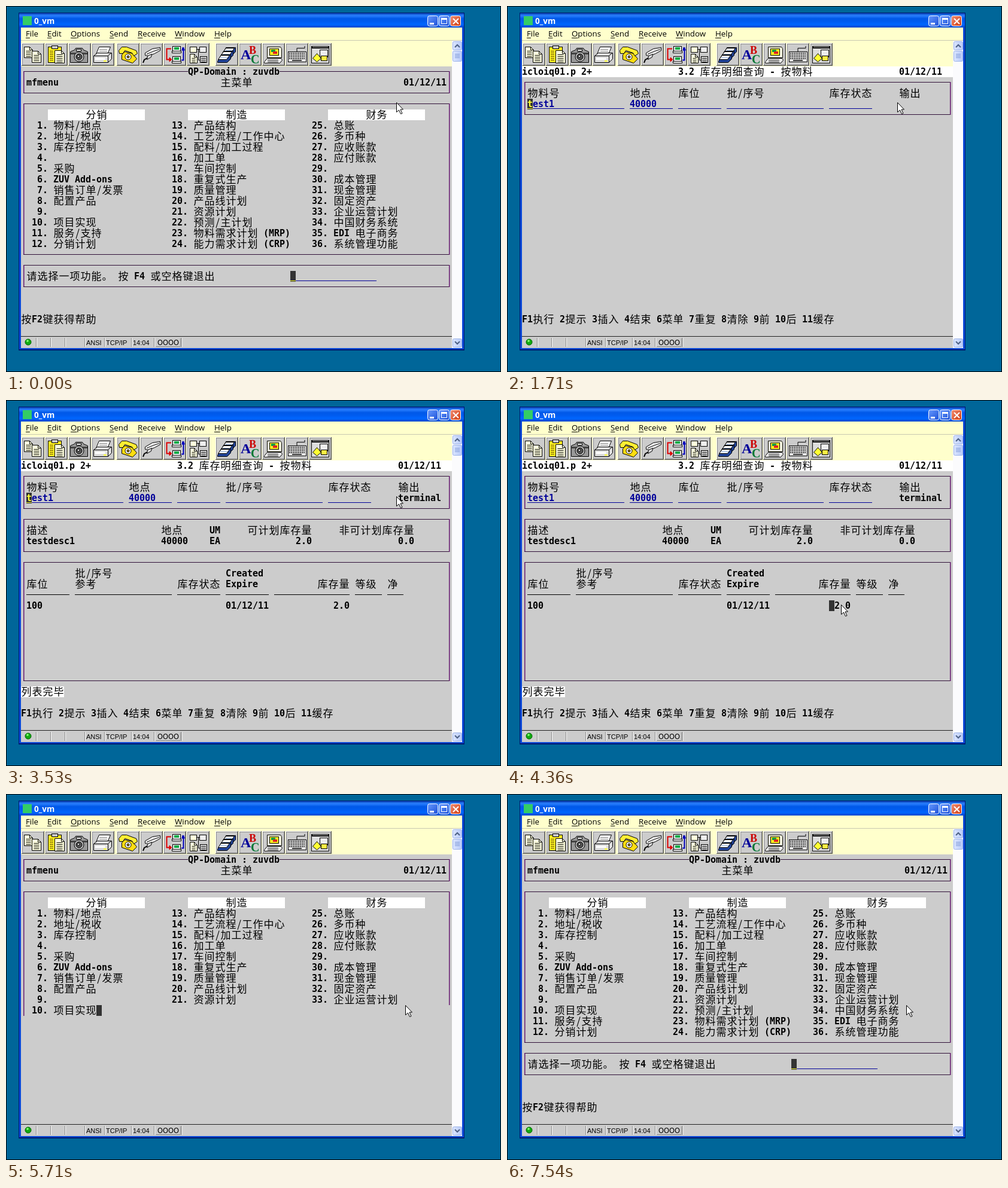
Recreate the animation shown at these times as an HTML page with a canvas. Size 827 by 612 pixels, loop 8 s.

```html
<!DOCTYPE html>
<html lang="zh">
<head>
<meta charset="utf-8">
<title>Terminal session</title>
<style>
html, body { margin: 0; width: 100%; height: 100%; overflow: hidden; background: #069; }
canvas { display: block; }
</style>
</head>
<body>
<canvas id="stage" width="827" height="612"></canvas>
<script>
const g = document.getElementById('stage').getContext('2d');
const LOOP = 8000, X0 = 25, Y0 = 101, CW = 9, RH = 18;
const GREY = '#cccccc', INK = '#000', BLUE = '#000099', DARK = '#333', YEL = '#ffff33';
const MONO = 'bold 15px "DejaVu Sans Mono", monospace';
const HAN = '300 17px "Noto Sans CJK SC", "Noto Sans CJK", sans-serif';

// ---- drawing helpers ----
function fill(c, x, y, w, h) { g.fillStyle = c; g.fillRect(x, y, w, h); }
function box(c, x, y, w, h, edge = INK) { fill(edge, x, y, w, h); fill(c, x + 1, y + 1, w - 2, h - 2); }
function path(p) {
  g.beginPath();
  for (let i = 0; i < p.length; i += 2) g.lineTo(p[i], p[i + 1]);
}
function poly(c, p, edge = INK) {
  path(p);
  g.closePath();
  g.fillStyle = c; g.fill();
  g.strokeStyle = edge; g.lineWidth = 1; g.stroke();
}
function line(c, p, w = 1) { path(p); g.strokeStyle = c; g.lineWidth = w; g.stroke(); }
function disc(c, x, y, r, edge = INK) {
  g.beginPath(); g.arc(x, y, r, 0, 7);
  g.fillStyle = c; g.fill();
  g.strokeStyle = edge; g.lineWidth = 1; g.stroke();
}
function label(s, x, y, font, c = INK) {
  g.font = font; g.fillStyle = c; g.textAlign = 'left';
  g.fillText(s, x, y);
}
function grad(x0, y0, x1, y1, ...stops) {
  const k = g.createLinearGradient(x0, y0, x1, y1);
  stops.forEach((c, i) => k.addColorStop(i / (stops.length - 1), c));
  return k;
}
function bevel(x, y, w, h, c = GREY) {
  fill('#555', x, y, w, h);
  fill('#fff', x, y, w - 1, h - 1);
  fill('#888', x + 1, y + 1, w - 2, h - 2);
  fill(c, x + 2, y + 2, w - 4, h - 4);
}
function rows(c, x, y, w, n, gap = 3) { for (let i = 0; i < n; i++) fill(c, x, y + i * gap, w, 1); }

// ---- toolbar ----
function page(x, y, w, h, c = '#ffffdd') {
  poly(c, [x, y, x + w - 5, y, x + w, y + 5, x + w, y + h, x, y + h]);
  line(INK, [x + w - 5, y, x + w - 5, y + 5, x + w, y + 5]);
  rows(INK, x + 3, y + 6.5, w - 6, Math.floor((h - 6) / 3));
}
function pc(x, y, c) {
  box('#eee', x, y, 14, 9);
  fill(c, x + 3, y + 2, 8, 4);
  box('#fff', x - 1, y + 8, 16, 4);
}
const icons = [
  [26, () => { page(4.5, 6.5, 14, 18); page(17.5, 13.5, 15, 19); }],
  [65, () => {
    box('#ffee22', 5, 6, 23, 27);
    box('#ccc', 11, 4, 11, 6);
    rows('#665500', 8, 13, 6, 6);
    page(16.5, 12.5, 16, 21);
  }],
  [104, () => {
    poly('#999', [3.5, 14.5, 10.5, 11.5, 12.5, 8.5, 23.5, 8.5, 25.5, 11.5, 32.5, 14.5, 32.5, 32.5, 3.5, 32.5]);
    fill('#444', 4, 16, 28, 3);
    box('#fff', 13, 10, 9, 4);
    disc('#bbb', 18, 23, 8);
    disc('#555', 18, 23, 5);
    disc('#eee', 17, 22, 2);
  }],
  [143, () => {
    poly('#fff', [12.5, 6.5, 31.5, 6.5, 26.5, 18.5, 7.5, 18.5]);
    rows('#777', 13, 10, 13, 3);
    poly('#ddd', [3.5, 21.5, 9.5, 16.5, 33.5, 16.5, 33.5, 26.5, 27.5, 32.5, 3.5, 32.5]);
    line(INK, [3, 21.5, 27.5, 21.5, 27.5, 32], 1);
    line(INK, [27, 21.5, 33, 16.5]);
    fill('#fff', 6, 25, 17, 3);
    fill(YEL, 20, 29, 5, 2);
  }],
  [185, () => {
    poly('#ffdd11', [8.5, 19.5, 13.5, 14.5, 26.5, 17.5, 33.5, 26.5, 26.5, 33.5, 8.5, 27.5]);
    poly('#ffee33', [3.5, 12.5, 8.5, 6.5, 16.5, 6.5, 32.5, 12.5, 34.5, 17.5, 28.5, 21.5, 25.5, 16.5, 13.5, 12.5, 10.5, 17.5, 4.5, 17.5]);
    disc('#fff', 19, 23, 5);
    disc('#aa8800', 19, 23, 2);
  }],
  [224, () => {
    poly('#eee', [8.5, 16.5, 20.5, 9.5, 33.5, 7.5, 33.5, 12.5, 24.5, 17.5, 14.5, 21.5, 8.5, 20.5]);
    line(INK, [11, 18.5, 23, 13.5, 32, 10.5]);
    poly('#ddd', [12.5, 21.5, 19.5, 18.5, 18.5, 23.5, 11.5, 27.5]);
    line(INK, [12, 25, 7, 28, 5, 33], 2);
  }],
  [263, () => {
    pc(15, 5, '#00aa44');
    pc(15, 22, '#00aa44');
    line('#dd0000', [13, 9.5, 5.5, 9.5, 5.5, 27.5, 12, 27.5], 2);
    poly('#dd0000', [10, 24, 14, 27.5, 10, 31], '#dd0000');
    line('#0000bb', [30, 28.5, 33.5, 28.5, 33.5, 8.5, 31, 8.5], 2);
    poly('#0000bb', [30.5, 12, 33.5, 7, 35.5, 12], '#0000bb');
  }],
  [302, () => {
    box('#ffffdd', 5, 6, 12, 10);
    box('#eee', 21, 6, 12, 10);
    line(INK, [17, 10.5, 22, 10.5]);
    line(INK, [19.5, 10, 19.5, 28.5, 23, 28.5]);
    page(5.5, 18.5, 12, 15);
    box('#ddd', 22, 22, 12, 11);
    rows(INK, 24, 25, 8, 3);
  }],
  [350, () => {
    for (let i = 0; i < 3; i++) {
      const x = 11.5 - i * 4, y = 7.5 + i * 6;
      poly('#224499', [x, y + 11, x + 6, y, x + 22, y, x + 22, y + 7, x + 16, y + 13, x, y + 13]);
      poly('#fff', [x + 1, y + 8, x + 6, y + 1, x + 20, y + 1, x + 15, y + 8]);
      line('#88aadd', [x + 5, y + 5, x + 16, y + 5]);
    }
  }],
  [389, () => {
    const f = s => 'bold ' + s + 'px "Liberation Serif", serif';
    label('A', 3, 27, f(24), '#000099');
    label('B', 17, 18, f(18), '#cc0000');
    label('C', 20, 34, f(20), '#007733');
  }],
  [428, () => {
    poly('#ffffdd', [8.5, 6.5, 30.5, 6.5, 32.5, 9.5, 32.5, 24.5, 8.5, 24.5]);
    box('#ffee22', 12, 9, 16, 12);
    fill('#009944', 15, 11, 7, 4);
    fill('#dd2222', 18, 14, 7, 4);
    poly('#eee', [3.5, 31.5, 8.5, 25.5, 31.5, 25.5, 33.5, 28.5, 29.5, 33.5, 3.5, 33.5]);
    rows(INK, 9, 28, 18, 2);
  }],
  [467, () => {
    box('#eee', 4, 14, 31, 18);
    for (let r = 0; r < 4; r++) for (let i = 0; i < 9; i++) fill('#333', 6 + i * 3, 16 + r * 3, 2, 2);
    fill('#333', 11, 28, 16, 2);
    line(INK, [19, 14, 19, 8.5, 32, 8.5, 32, 5]);
  }],
  [506, () => {
    box('#ddd', 4, 5, 30, 29);
    fill(INK, 4, 5, 30, 4);
    rows('#ccc', 6, 6, 26, 1);
    box('#eee', 18, 11, 14, 13);
    poly(YEL, [6.5, 25.5, 13.5, 17.5, 20.5, 25.5, 13.5, 31.5]);
    box('#ffee44', 20, 21, 11, 9);
  }]
];

// ---- window ----
function winButton(x, c0, c1) {
  g.beginPath(); g.roundRect(x + .5, 16.5, 17, 17, 3);
  g.fillStyle = grad(x, 16, x + 17, 34, c0, c1); g.fill();
  g.strokeStyle = '#fff'; g.lineWidth = 1; g.stroke();
}
function scrollButton(y, h) {
  g.beginPath(); g.roundRect(746.5, y + .5, 15, h - 1, 2);
  g.fillStyle = grad(746, 0, 762, 0, '#dce6ff', '#b6c9f8'); g.fill();
  g.strokeStyle = '#9db4e8'; g.lineWidth = 1; g.stroke();
}
function chrome() {
  fill(INK, 0, 0, 827, 612);
  fill('#006699', 1, 1, 825, 610);
  fill('#001a70', 21, 11, 745, 565);
  fill('#0a48d8', 22, 12, 743, 562);
  fill(grad(0, 11, 0, 36, '#0030a0', '#2a80ff', '#0058e8', '#005cf0', '#0066ff', '#0044cc'), 22, 12, 743, 24);
  fill('#33cc66', 28, 17, 15, 15);
  label('0_vm', 47, 30, 'bold 13.5px "Open Sans", sans-serif', '#fff');
  winButton(704, '#6a9cff', '#1c50d8');
  fill('#fff', 708, 28, 7, 3);
  winButton(723, '#6a9cff', '#1c50d8');
  g.strokeStyle = '#fff'; g.strokeRect(727.5, 20.5, 9, 9);
  fill('#fff', 727, 20, 10, 3);
  winButton(742, '#f09078', '#d03c10');
  line('#fff', [747, 21, 756, 30], 2);
  line('#fff', [756, 21, 747, 30], 2);

  fill('#ffffcc', 25, 36, 737, 65);
  fill('#c8c8b0', 25, 57, 737, 1);
  const menu = [['File', 33], ['Edit', 69], ['Options', 108], ['Send', 173], ['Receive', 220], ['Window', 282], ['Help', 348]];
  for (const [s, x] of menu) {
    label(s, x, 51, '13.3px "Open Sans", sans-serif');
    fill(INK, x, 53, g.measureText(s[0]).width, 1);
  }
  for (const [x, draw] of icons) {
    bevel(x, 62, 38, 38);
    g.save(); g.translate(x, 62); draw(); g.restore();
  }

  fill('#fbfbfd', 745, 58, 17, 514);
  scrollButton(59, 15);
  scrollButton(75, 18);
  scrollButton(556, 15);
  line('#4d6185', [750, 69, 754, 65, 758, 69], 2);
  line('#4d6185', [750, 561, 754, 565, 758, 561], 2);
  rows('#8ca4dc', 750, 80, 8, 4, 2);

  fill(GREY, X0, Y0, 720, 471);
  fill('#222', X0, 552, 720, 1);
  for (const x of [50, 74, 98, 131, 164, 209, 247, 293]) {
    fill('#888', x, 555, 1, 15);
    fill('#fff', x + 1, 555, 1, 15);
  }
  disc('#11aa11', 37, 562, 5, '#006600');
  disc('#99ff88', 36, 560, 1.5, '#66ee55');
  const small = '11px "Liberation Sans", sans-serif';
  label('ANSI', 134, 567, small);
  label('TCP/IP', 167, 567, small);
  label('14:04', 212, 567, small);
  line('#888', [250.5, 569.5, 291.5, 569.5, 291.5, 555.5]);
  label('OOOO', 253, 567, '11.4px "DejaVu Sans", sans-serif');
}

// ---- terminal grid ----
const px = c => X0 + c * CW, py = r => Y0 + r * RH;
function put(r, c, s, color = INK) {
  g.fillStyle = color; g.textAlign = 'center';
  let wide = false;
  for (const ch of s) {
    const thin = ch === '/' && wide;
    wide = ch > '\u2e7f';
    g.font = wide || thin ? HAN : MONO;
    g.fillText(ch, px(c) + (wide ? CW : CW / 2), py(r) + (wide || thin ? 15 : 14));
    c += wide ? 2 : 1;
  }
}
function frame(r0, r1) {
  const y = py(r0) + 8, h = (r1 - r0) * RH;
  fill('#301038', 29, y, 712, 1);
  fill('#301038', 29, y + h, 712, 1);
  fill('#661a70', 29, y, 1.5, h);
  fill('#661a70', 740, y, 1.5, h + 1);
}
function caret(r, c, field, ch) {
  fill(DARK, px(c), py(r), CW, RH);
  if (field) fill(YEL, px(c), py(r) + 16, CW, 1);
  if (ch) put(r, c, ch, YEL);
}
function input(r, c, n, s, live) {
  if (live) fill(BLUE, px(c), py(r) + 16, n * CW, 1);
  put(r, c, s, live ? BLUE : INK);
}

const columns = [
  [5, '分销', '物料/地点,地址/税收,库存控制,,采购,ZUV Add-ons,销售订单/发票,配置产品,,项目实现,服务/支持,分销计划'],
  [31, '制造', '产品结构,工艺流程/工作中心,配料/加工过程,加工单,车间控制,重复式生产,质量管理,产品线计划,资源计划,预测/主计划,物料需求计划 (MRP),能力需求计划 (CRP)'],
  [57, '财务', '总账,多币种,应收账款,应付账款,,成本管理,现金管理,固定资产,企业运营计划,中国财务系统,EDI 电子商务,系统管理功能']
];
function menuScreen(typed) {
  frame(0, 2);
  fill(GREY, px(31), py(0), 17 * CW, RH);
  put(0, 31, 'QP-Domain : zuvdb');
  put(1, 1, 'mfmenu');
  put(1, 37, '主菜单');
  put(1, 71, '01/12/11');
  frame(3, 17);
  columns.forEach(([c, head, list], k) => {
    fill('#fff', px(c), py(4), 18 * CW, RH);
    put(4, c + 7, head);
    list.split(',').forEach((s, i) => {
      put(5 + i, c - 3 - (k ? 0 : 0), String(k * 12 + i + 1).padStart(2) + '.');
      put(5 + i, c + 1, s);
    });
  });
  frame(18, 20);
  put(19, 1, '请选择一项功能。 按 F4 或空格键退出');
  input(19, 50, 16, typed, true);
  put(23, 0, '按F2键获得帮助');
}

function queryScreen(t) {
  const live = t < 2350 || t >= 3530, results = t >= 3530;
  fill('#fff', X0, Y0, 720, RH);
  put(0, 0, 'icloiq01.p 2+');
  put(0, 29, '3.2 库存明细查询 - 按物料');
  put(0, 70, '01/12/11');
  frame(1, 4);
  const fields = [[1, 18, '物料号', 'test1'], [20, 8, '地点', '40000'], [29, 8, '库位', ''], [38, 18, '批/序号', ''], [57, 8, '库存状态', '']];
  for (const [c, n, head, s] of fields) {
    put(2, c, head);
    input(3, c, n, s, live);
  }
  put(2, 70, '输出');
  if (t >= 2350) input(3, 70, 8, 'terminal', t < 2890);
  if (t < 2890 || results) put(23, 0, 'F1执行 2提示 3插入 4结束 6菜单 7重复 8清除 9前 10后 11缓存');
  if (!results) return;

  frame(5, 8);
  const info = [[1, '描述', 1, 'testdesc1'], [26, '地点', 26, '40000'], [35, 'UM', 35, 'EA'], [42, '可计划库存量', 51, '2.0'], [59, '非可计划库存量', 70, '0.0']];
  for (const [c, head, d, s] of info) { put(6, c, head); put(7, d, s); }
  frame(9, 20);
  put(10, 10, '批/序号');
  put(10, 38, 'Created');
  const heads = [[1, '库位'], [10, '参考'], [29, '库存状态'], [38, 'Expire'], [55, '库存量'], [62, '等级'], [68, '净']];
  for (const [c, s] of heads) put(11, c, s);
  for (const [c, n] of [[1, 8], [10, 18], [29, 8], [38, 8], [47, 14], [62, 5], [68, 3]]) fill(INK, px(c), py(12) + 8, n * CW, 1);
  put(13, 1, '100');
  put(13, 38, '01/12/11');
  put(13, 58, '2.0');
  fill('#fff', X0, py(21), 8 * CW, RH);
  put(21, 0, '列表完毕');
}

// Redraw of the menu, line by line, up to row r and column c.
function partialMenu(r, c) {
  g.save();
  g.beginPath();
  g.rect(X0, Y0, 720, r * RH);
  g.rect(X0, py(r), c * CW, RH);
  g.clip();
  menuScreen('');
  g.restore();
  caret(r, c);
}

// ---- mouse ----
const track = [[3640, 652, 161], [4360, 558, 342], [4470, 552, 351], [4680, 546, 354], [5000, 580, 352], [5300, 635, 354], [5400, 667, 353]];
function mouse(t) {
  const q = t < 3740 ? 3640 : t >= 5400 ? 5400 : 3740 + Math.floor((t - 3735) / 104) * 104;
  let i = 1;
  while (i < track.length - 1 && q > track[i][0]) i++;
  const [t0, x0, y0] = track[i - 1], [t1, x1, y1] = track[i];
  let k = Math.min(1, (q - t0) / (t1 - t0));
  if (i === 1) k = k * k * (3 - 2 * k);
  g.save();
  g.translate(Math.round(x0 + (x1 - x0) * k) + .5, Math.round(y0 + (y1 - y0) * k) + .5);
  poly('#fff', [0, 0, 0, 16, 4, 12.5, 7, 19, 9.5, 18, 6.5, 11.5, 11, 11.5]);
  g.restore();
}

// ---- timeline ----
function screen(t) {
  if (t < 1390) {
    const n = t < 640 ? 0 : t < 1180 ? 1 : t < 1280 ? 2 : 3;
    menuScreen('3.2'.slice(0, n));
    if (t < 100 || t >= 640) caret(19, 50 + n, true);
  } else if (t < 1710) {
    return;
  } else if (t < 5400) {
    queryScreen(t);
    const home = t < 1920 || (t >= 3530 && t < 4050) || (t >= 4570 && t < 5100);
    if (home) caret(3, 1, true, 't');
    if (t >= 2890 && t < 3430) caret(23, 78);
    if (t >= 4260 && t < 4570) caret(13, 57);
  } else if (t < 5500) {
    return;
  } else if (t < 5610) {
    partialMenu(4, 16);
  } else if (t < 5710) {
    partialMenu(9, 20);
  } else if (t < 5820) {
    partialMenu(14, 14);
  } else if (t < 5920) {
    partialMenu(18, 40);
  } else {
    menuScreen('');
    if ((t >= 6460 && t < 7000) || t >= 7540) caret(19, 50, true);
  }
}

const start = performance.now();
function tick() {
  const t = (performance.now() - start) % LOOP;
  chrome();
  screen(t);
  mouse(t);
  requestAnimationFrame(tick);
}
tick();
</script>
</body>
</html>
```
